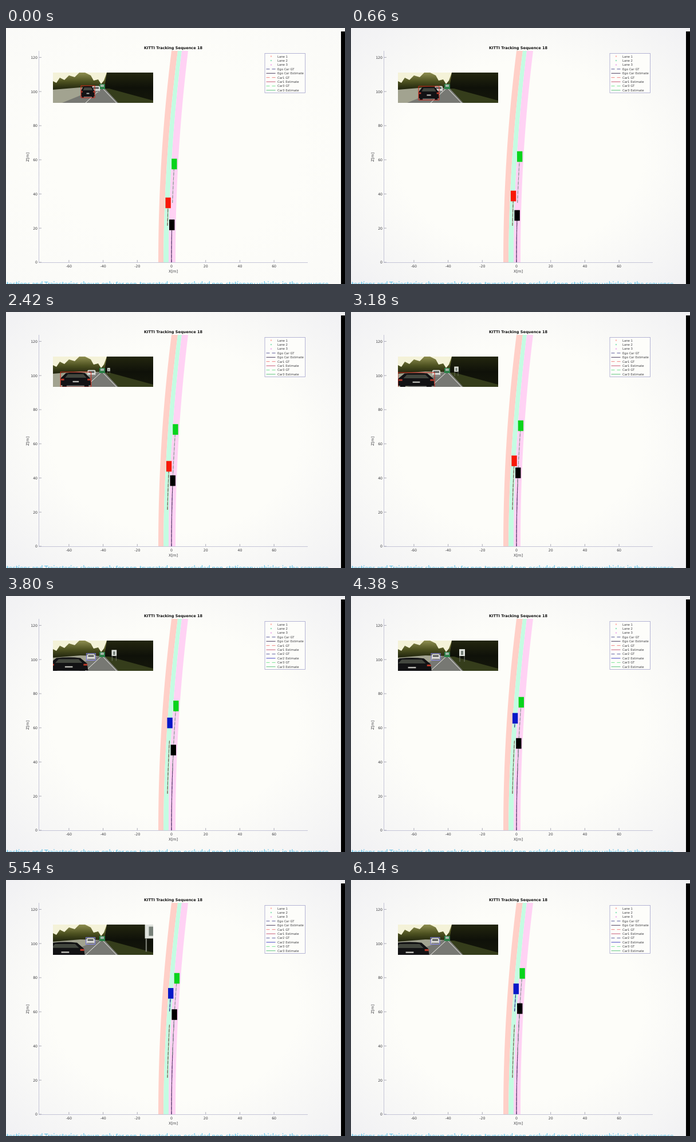
These frames come from a looping animation (592x448 px, 6.16 s). An HTML page:

```html
<!DOCTYPE html>
<html lang="en">
<head>
<meta charset="utf-8">
<title>Vehicle tracking plot</title>
<style>
html, body { margin: 0; width: 100%; height: 100%; overflow: hidden; background: #fdfdf9; }
svg { display: block; width: 592px; height: 448px; }
text { font-family: "DejaVu Sans", sans-serif; fill: #3c3c40; }
.mid { text-anchor: middle; }
.end { text-anchor: end; }
.note { font: 11.75px Lato, sans-serif; fill: #5cc0e6; }
</style>
</head>
<body>
<svg viewBox="0 0 592 448">
  <defs>
    <radialGradient id="edge" cx=".5" cy=".5" r=".72">
      <stop offset=".5" stop-color="#f1f1f3" stop-opacity="0"/>
      <stop offset="1" stop-color="#f0f0f3"/>
    </radialGradient>
    <linearGradient id="trees" x1="0" y1="0" x2="0" y2="1">
      <stop offset="0" stop-color="#8e8e50"/>
      <stop offset=".3" stop-color="#4d5120"/>
      <stop offset=".52" stop-color="#262a10"/>
    </linearGradient>
    <linearGradient id="shade" x1="0" y1="0" x2="0" y2="1">
      <stop offset="0" stop-color="#23260f"/>
      <stop offset=".5" stop-color="#0f1109"/>
      <stop offset="1" stop-color="#15180b"/>
    </linearGradient>
    <clipPath id="view"><rect x="82" y="78" width="175" height="53"/></clipPath>
  </defs>
  <rect width="592" height="448" fill="#fdfdf9"/>
  <rect id="tint" width="592" height="448" fill="url(#edge)"/>
  <g id="plot"></g>
  <g id="trails" fill="none"></g>
  <g id="cars"></g>

  <g clip-path="url(#view)">
    <rect x="82" y="78" width="175" height="53" fill="url(#trees)"/>
    <g fill="#f4f2d8">
      <path d="M82 78H128L120 86 110 83 102 91 94 87 88 96 82 93Z"/>
      <path d="M138 78H176L171 92 166 98 161 90 153 92 148 83Z"/>
    </g>
    <path d="M82 108L130 104 166 105 100 131H82Z" fill="#a2a390"/>
    <path d="M176 78H257V131H174L172 104Z" fill="url(#shade)"/>
    <path d="M171 106L180 106 257 127V131H194Z" fill="#353d1b"/>
    <path d="M164 104H171L196 131H98Z" fill="#777873"/>
    <path d="M169 106L193 131M166 106L139 131" stroke="#f0f0ea" fill="none"/>
    <g id="sign">
      <rect x="-5" y="-6" width="10" height="12" fill="#dfe2dc"/>
      <rect x="-2" y="-3" width="4" height="7" fill="#778078"/>
      <path d="M-4 6V16M4 6V16" stroke="#777a70"/>
    </g>
    <rect x="163" y="98" width="10" height="9" fill="#2c8048"/>
    <rect x="165" y="99" width="6" height="4" fill="#a1b5a8"/>
    <g id="far">
      <rect x="-7" y="-5" width="14" height="10" rx="2" fill="#dcdcd8"/>
      <rect x="-5" y="-3" width="10" height="3" fill="#555855"/>
      <path d="M-6 4H6" stroke="#555"/>
      <rect id="farBox" x="-8" y="-6" width="16" height="12" fill="none" stroke="#7c7ce0"/>
    </g>
    <g id="near">
      <path d="M0 .42L.18 .06Q.5 -.02 .8 .06L.97 .42 1 .88H.92V1H.78V.9H.2V1H.06V.88H0Z" fill="#121214"/>
      <path d="M.15 .38L.24 .14H.75L.85 .38Z" fill="#43473f"/>
      <path d="M.02 .45H.12V.56H.02ZM.88 .45H.98V.56H.88Z" fill="#b83a2a"/>
      <path d="M.4 .6H.6V.69H.4Z" fill="#b9b9b4"/>
      <rect id="nearBox" width="1" height="1" fill="none" stroke="#d22718" vector-effect="non-scaling-stroke"/>
    </g>
  </g>

  <g id="legend"></g>
  <text x="566" y="452" class="end note">Detections and Trajectories shown only for non-truncated non-occluded non-stationary vehicles in the sequence.</text>
  <rect x="585" y="6" width="7" height="442" fill="#000"/>
</svg>
<script>
const LOOP = 6160, CAR2_START = 3220, CAR1_END = 3740;
const TIMES = [0, 660, 1640, 3180, 4380, 4960, 6140];
const $ = id => document.getElementById(id);

function add(parent, tag, attrs, text) {
  const el = document.createElementNS("http://www.w3.org/2000/svg", tag);
  for (const key in attrs) el.setAttribute(key, attrs[key]);
  if (text) el.textContent = text;
  parent.append(el);
  return el;
}

// Cubic Hermite interpolation: speed changes smoothly from key to key.
function glide(t, values, times = TIMES) {
  const last = times.length - 1;
  t = Math.max(times[0], Math.min(times[last], t));
  let i = 0;
  while (i < last - 1 && t > times[i + 1]) i++;
  const slope = k => {
    const a = Math.max(0, k - 1), b = Math.min(last, k + 1);
    return (values[b] - values[a]) / (times[b] - times[a]);
  };
  const span = times[i + 1] - times[i], p = (t - times[i]) / span, q = 1 - p;
  return values[i] * q * q * (1 + 2 * p) + values[i + 1] * p * p * (3 - 2 * p)
    + span * p * q * (slope(i) * q - slope(i + 1) * p);
}

// The road bends to the right as a parabola.
const bend = y => 23 * ((410 - y) / 370) ** 2;

function curve(base, from, to, spread = 0) {
  const points = [];
  for (let i = 0; i <= 20; i++) {
    const y = from + (to - from) * i / 20;
    points.push((base + bend(y) + spread * (410 - y) / 370).toFixed(2) + " " + y.toFixed(2));
  }
  return points.join("L");
}

function drawPlot() {
  const plot = $("plot");
  const lane = (left, right, spreadL, spreadR, fill) => add(plot, "path", {
    d: "M" + curve(left, 410, 40, spreadL) + "L" + curve(right, 40, 410, spreadR) + "Z", fill
  });
  lane(266, 275, 0, 2, "#ffd0c8");
  lane(275, 284, 2, 0, "#c4fce2");
  lane(284, 296, 0, -1, "#ffd2f4");
  add(plot, "path", { d: "M57.5 40V410.5H527", fill: "none", stroke: "#b8b8d0", "stroke-width": .8 });
  for (let m = -60; m <= 60; m += 20) {
    const x = 289 + m * 2.985;
    add(plot, "path", { d: `M${x} 410V406`, stroke: "#9a9aa8", "stroke-width": .8 });
    add(plot, "text", { x, y: 418.5, class: "mid", "font-size": 6.2 }, String(m));
  }
  for (let m = 0; m <= 120; m += 20) {
    const y = 410 - m * 2.988;
    add(plot, "path", { d: `M57.5 ${y}H62`, stroke: "#9a9aa8", "stroke-width": .8 });
    add(plot, "text", { x: 55, y: y + 2.3, class: "end", "font-size": 6.2 }, String(m));
  }
  add(plot, "text", { x: 292, y: 427.5, class: "mid", "font-size": 6.6 }, "X[m]");
  add(plot, "text", { transform: "translate(40 226) rotate(-90)", class: "mid", "font-size": 6.6 }, "Z[m]");
  add(plot, "text", { x: 292, y: 37, class: "mid", "font-size": 6.55, "font-weight": "bold", style: "fill:#111" },
    "KITTI Tracking Sequence 18");
}

function drawLegend(withCar2) {
  const legend = $("legend");
  const rows = [
    ["Lane 1", "#ffb8b0"], ["Lane 2", "#98e4c0"], ["Lane 3", "#f0b4f0"],
    ["Ego Car GT", "#5a5a9c", 1], ["Ego Car Estimate", "#4c3c60"],
    ["Car1 GT", "#f08080", 1], ["Car1 Estimate", "#c85a78"],
    ["Car2 GT", "#6464a4", 1], ["Car2 Estimate", "#4848c4"],
    ["Car3 GT", "#78e494", 1], ["Car3 Estimate", "#5cc47c"]
  ].filter(([name]) => withCar2 || !name.startsWith("Car2"));
  legend.replaceChildren();
  add(legend, "rect", {
    x: 452, y: 44.5, width: 70.5, height: withCar2 ? 84 : 69,
    fill: "#fdfdfa", stroke: "#a4a4cc", "stroke-width": .8
  });
  rows.forEach(([name, color, dashed], i) => {
    const y = 49.6 + i * 7.42;
    if (i < 3) add(legend, "circle", { cx: 463, cy: y, r: 1.3, fill: color });
    else add(legend, "path", {
      d: `M454.5 ${y}H470.5`, stroke: color, "stroke-width": 1, "stroke-dasharray": dashed ? "6 4" : "none"
    });
    add(legend, "text", { x: 474, y: y + 1.9, "font-size": 5.3 }, name);
  });
}

const vehicles = [
  { base: 289, start: 410, ys: [344.5, 328, 309, 281.5, 258, 246, 225], fill: "#000", line: "#3a2c4c", dash: "#6c4a88" },
  { base: 281.3, start: 346, ys: [306, 294, 280, 260.5, 245, 238, 222], fill: "#f81808", line: "#b08078", dash: "#6c5c50", to: CAR1_END },
  { base: 280.2, start: 230, ys: [280, 262, 249, 230.5, 214, 206, 190.5], fill: "#0818c8", line: "#4a5cd0", dash: "#24247c", from: CAR2_START },
  { base: 288.9, start: 306, ys: [238, 225, 212.5, 199, 186, 180, 163.5], fill: "#08d41c", line: "#b4b8c0", dash: "#84948c" }
];

for (const v of vehicles) {
  v.trail = add($("trails"), "path", { stroke: v.line, "stroke-width": 1 });
  v.truth = add($("trails"), "path", { stroke: v.dash, "stroke-width": 1, "stroke-dasharray": "5 3" });
  v.box = add($("cars"), "rect", { width: 9.4, height: 18.6, fill: v.fill });
}

const show = (el, visible) => el.setAttribute("visibility", visible ? "visible" : "hidden");

function drawVehicle(v, t) {
  const { from = 0, to = LOOP } = v;
  const y = glide(Math.min(t, to), v.ys);
  const d = "M" + curve(v.base, v.start, y);
  for (const path of [v.trail, v.truth]) {
    path.setAttribute("d", d);
    show(path, t >= from);
  }
  v.box.setAttribute("x", v.base + bend(y) - 4.7);
  v.box.setAttribute("y", y - 9.3);
  show(v.box, t >= from && t < to);
}

function drawCamera(t) {
  const left = glide(t, [131, 118, 109, 82, 72, 70, 68]);
  const right = glide(t, [155, 154, 151, 146, 141, 139, 137]);
  const top = glide(t, [101, 102, 104, 106, 107.5, 108, 108]);
  const bottom = glide(t, [122, 126, 130, 132, 135, 136, 137]);
  $("near").setAttribute("transform", `translate(${left} ${top}) scale(${right - left} ${bottom - top})`);
  show($("nearBox"), t < CAR1_END);
  $("far").setAttribute("transform", `translate(${glide(t, [157, 153, 150, 149, 148, 148, 147])} 106.5)`);
  show($("farBox"), t >= CAR2_START);
  const signTimes = [2200, 3180, 4380, 4960, 5700];
  const x = glide(t, [178, 184, 194, 201, 270], signTimes);
  const y = glide(t, [101, 100, 99, 97, 86], signTimes);
  const size = glide(t, [.4, .75, 1, 1.3, 2.6], signTimes);
  $("sign").setAttribute("transform", `translate(${x} ${y}) scale(${size})`);
  show($("sign"), t > 2200 && t < 5700);
}

let legendState = null;
function render(t) {
  $("tint").setAttribute("opacity", Math.min(1, .25 + .75 * t / 620));
  for (const v of vehicles) drawVehicle(v, t);
  drawCamera(t);
  const withCar2 = t >= CAR2_START;
  if (withCar2 !== legendState) drawLegend(legendState = withCar2);
}

drawPlot();
render(0);
const begin = performance.now();
(function tick() {
  const t = (performance.now() - begin) % LOOP;
  render(Math.floor(t / 20) * 20);
  requestAnimationFrame(tick);
})();
</script>
</body>
</html>
```
